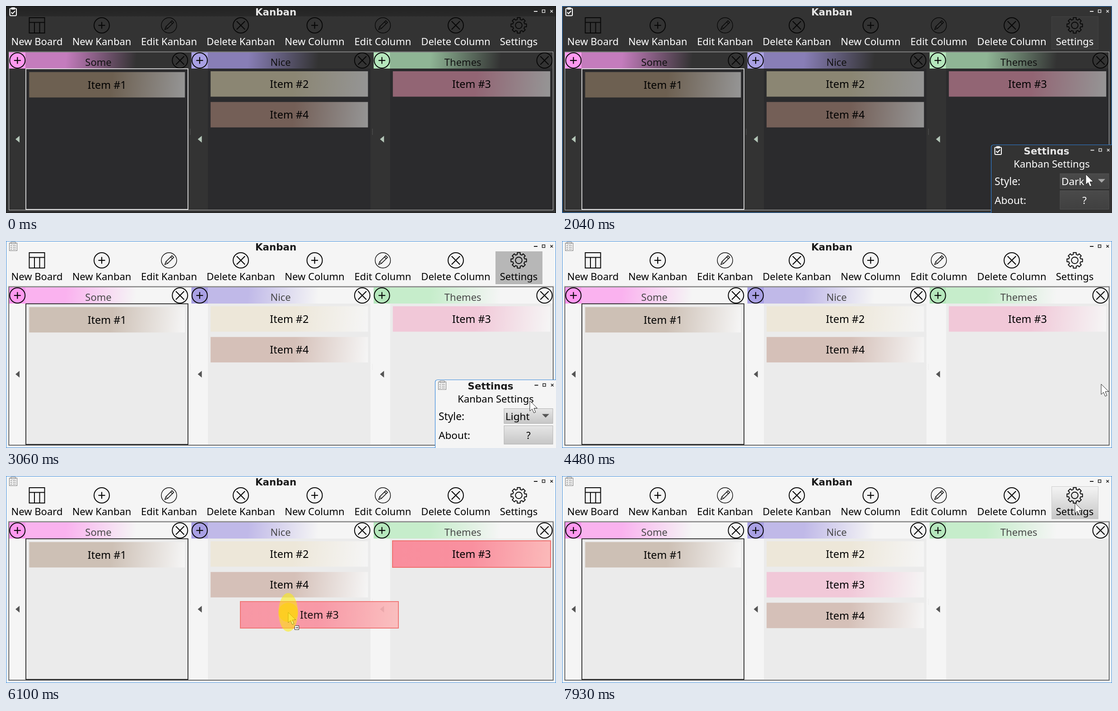
Write an HTML page with a canvas that moves like this. It is 1218 by 460 pixels and loops after 8000 ms.

```html
<!DOCTYPE html>
<html lang="en">
<head>
<meta charset="utf-8">
<title>Kanban board</title>
<style>
html, body { margin: 0; width: 100%; height: 100%; overflow: hidden; }
canvas { display: block; }
</style>
</head>
<body>
<canvas id="stage" width="1218" height="460"></canvas>
<script>
const g = document.getElementById('stage').getContext('2d');
const LOOP = 8000;

const DARK = {
  bg: '#333333', body: '#2b2b2d', text: '#ffffff', title: '#e6e6e6', heading: '#111111',
  frame: '#c4c4c4', focus: '#ffffff', arrow: '#b4c6b8', grip: '#777777', icon: '#080808',
  edge: '#2f7fd3', button: ['#4a4a4a', '#404040'], buttonEdge: '#525252', caret: '#a8a8a8',
  heads: ['#c47cbd', '#887eb6', '#8fb595'], cardEnd: '#959595',
  cards: ['#6d6051', '#8b8673', '#926574', '#745f57']
};
const LIGHT = {
  bg: '#f5f5f5', body: '#ebebeb', text: '#000000', title: '#1a1a1a', heading: '#484848',
  frame: '#202020', focus: '#000000', arrow: '#555555', grip: '#e4e4e4', icon: '#080808',
  edge: '#3a8bdc', button: ['#e6e6e6', '#c6c6c6'], buttonEdge: '#b0b0b0', caret: '#555555',
  heads: ['#fab2ef', '#c0b9e8', '#c6edcb'], cardEnd: '#f5f5f5',
  cards: ['#cdc0b5', '#ede7d9', '#f1c8d8', '#d5c0b8']
};
const PLUS_COLORS = ['#ff99f0', '#a9a0e4', '#b5e7bc'];
const COLUMNS = ['Some', 'Nice', 'Themes'];
const columnX = i => 7 + 403.6 * i;

// Pointer track: start time, x, y, mouse pressed
const POINTER = [
  [400, 1185, 190], [600, 1136, 48], [800, 1136, 48, 1], [1020, 1136, 48],
  [1420, 1141, 110], [1620, 1150, 240], [1820, 1158, 350], [2020, 1160, 374],
  [2220, 1160, 374, 1], [2450, 1160, 374], [2660, 1160, 355], [2860, 1160, 355, 1],
  [3060, 1160, 355], [3660, 1180, 340], [3860, 1207, 320], [4060, 1207, 320, 1],
  [4260, 1207, 320], [4480, 1194, 318], [4680, 656, 200], [4900, 962, 168, 1],
  [5100, 930, 180, 1], [5300, 850, 225, 1], [5500, 740, 285, 1], [5700, 620, 320, 1],
  [5900, 554, 323, 1], [6100, 625, 303, 1], [6320, 602, 303], [7330, 740, 270],
  [7530, 980, 160], [7730, 1128, 80], [7930, 1136, 60]
];

let theme;

function rect(x, y, w, h, fill, stroke, lineWidth = 1) {
  if (fill) { g.fillStyle = fill; g.fillRect(x, y, w, h); }
  if (stroke) { g.strokeStyle = stroke; g.lineWidth = lineWidth; g.strokeRect(x, y, w, h); }
}

function text(str, x, y, color, size = 22, align = 'center') {
  g.font = `${size}px "Noto Sans", sans-serif`;
  g.textAlign = align;
  g.fillStyle = color;
  g.fillText(str, x, y);
}

function line(points, color, width = 2, fill) {
  g.beginPath();
  points.forEach(([x, y]) => g.lineTo(x, y));
  if (fill) { g.closePath(); g.fillStyle = fill; g.fill(); }
  if (color) { g.strokeStyle = color; g.lineWidth = width; g.stroke(); }
}

function circle(x, y, r, color, width) {
  g.beginPath();
  g.arc(x, y, r, 0, 7);
  g.strokeStyle = color;
  g.lineWidth = width;
  g.stroke();
}

function at(x, y, angle, draw) {
  g.save();
  g.translate(x, y);
  g.rotate(angle);
  draw();
  g.restore();
}

function gradient(x0, y0, x1, y1, stops) {
  const fill = g.createLinearGradient(x0, y0, x1, y1);
  stops.forEach(([pos, color]) => fill.addColorStop(pos, color));
  return fill;
}

const vertical = (y, h, [top, bottom]) => gradient(0, y, 0, y + h, [[0, top], [1, bottom]]);

// Circled plus; turned by 45 degrees it becomes the delete cross
function plus(x, y, arm, angle = 0) {
  at(x, y, angle, () => {
    circle(0, 0, 17, theme.icon, 2);
    line([[-arm, 0], [arm, 0]], theme.icon, 2.2);
    line([[0, -arm], [0, arm]], theme.icon, 2.2);
  });
}
const add = (x, y) => plus(x, y, 7.5);
const remove = (x, y) => plus(x, y, 13, Math.PI / 4);

function table(x, y) {
  at(x, y, 0, () => {
    rect(-17, -17, 34, 34, null, theme.icon, 2);
    line([[-17, -6.5], [17, -6.5]], theme.icon);
    for (const dx of [-5.5, 6]) line([[dx, -6.5], [dx, 17]], theme.icon);
  });
}

function pencil(x, y) {
  circle(x, y, 17, theme.icon, 1.4);
  at(x, y, Math.PI / 4, () => {
    line([[-2.7, -12], [2.7, -12], [2.7, 7], [0, 13], [-2.7, 7], [-2.7, -12.7]], theme.icon, 1.5);
    line([[-2.7, -8], [2.7, -8]], theme.icon, 1.5);
    line([[-2.7, 7], [2.7, 7]], theme.icon, 1);
  });
}

function gear(x, y) {
  at(x, y, 0, () => {
    g.beginPath();
    for (let i = 0; i < 8; i++) {
      const a = i * Math.PI / 4;
      for (const [da, r] of [[-.24, 13.5], [-.19, 17.5], [.19, 17.5], [.24, 13.5]])
        g.lineTo(r * Math.cos(a + da), r * Math.sin(a + da));
    }
    g.closePath();
    g.lineJoin = 'round';
    g.strokeStyle = theme.icon;
    g.lineWidth = 1.9;
    g.stroke();
    circle(0, 0, 7.3, theme.icon, 1.9);
  });
}

const TOOLS = [
  ['New Board', 68.5, table], ['New Kanban', 212, add], ['Edit Kanban', 361, pencil],
  ['Delete Kanban', 520, remove], ['New Column', 683.5, add], ['Edit Column', 834.5, pencil],
  ['Delete Column', 996, remove], ['Settings', 1135.5, gear]
];

function clipboard() {
  if (theme === DARK) {
    g.beginPath();
    g.roundRect(8.5, 5.5, 14.5, 16, 2);
    g.strokeStyle = '#ffffff';
    g.lineWidth = 2;
    g.stroke();
    rect(12, 3, 7.5, 5, '#ffffff');
    line([[11.5, 14], [14.5, 17], [20, 11]], '#ffffff');
    return;
  }
  rect(7.5, 4.5, 17, 17, null, '#777777');
  rect(11, 2.5, 10, 3.5, '#e4e4e4', '#777777');
  for (const y of [10, 14, 18]) {
    line([[10, y], [11.2, y + 1], [13, y - 1]], '#555555', 1);
    line([[15, y], [22, y]], '#777777', 1);
  }
}

function titleBar(title, x, buttonsX) {
  clipboard();
  g.font = 'bold 21.4px "DejaVu Sans", sans-serif';
  g.textAlign = 'center';
  g.fillStyle = theme.title;
  g.fillText(title, x, 21);
  at(buttonsX, 0, 0, () => {
    rect(0, 11, 8, 2, theme.title);
    rect(18.5, 8.5, 6, 6, null, theme.title, 1.4);
    line([[36.5, 9], [42, 14.5]], theme.title, 1.5);
    line([[42, 9], [36.5, 14.5]], theme.title, 1.5);
  });
}

function toolbar(t) {
  const hover = t >= 600 && t < 4260 || t >= 7730;
  if (hover) {
    if (theme === DARK) rect(1084.5, 23.5, 103, 72, '#393939', '#424242');
    else if (t < 4260) rect(1084, 23, 104, 73, '#b7b7b7');
    else rect(1084.5, 23.5, 103, 72, vertical(23, 73, ['#f4f4f4', '#c6c6c6']), '#cccccc');
  }
  for (const [label, x, icon] of TOOLS) {
    icon(x, 43);
    text(label, x, 87, theme.text);
  }
}

function card(n, column, slot) {
  const inset = column === 0 ? 1.8 : 0;
  const x = columnX(column) + 42.5 + inset, y = 145 + 68.3 * slot + inset;
  const w = 348.5 - inset * 2, c = theme.cards[n - 1];
  rect(x, y, w, 56.5, gradient(x, y, x + w, y + 40, [[0, c], [.53, c], [1, theme.cardEnd]]));
  text('Item #' + n, x + w / 2, y + 37, '#000000', 23.4);
}

function redCard(x, y) {
  rect(x + 1, y + 1, 350, 59,
    gradient(x, y, x + 352, y + 40, [[0, '#f98e9d'], [.5, '#f9909f'], [1, '#fbbaba']]), '#f0706f', 2);
  text('Item #3', x + 176, y + 39, '#000000', 23.4);
}

function column(i) {
  const x = columnX(i);
  rect(x + 36.5, 139, 360, 313, theme.body);
  rect(x + 36.5, 103, 360, 36,
    gradient(x + 36, 103, x + 396, 140, [[0, theme.heads[i]], [.25, theme.heads[i]], [.68, theme.bg]]));
  rect(x, 103, 36.5, 36, PLUS_COLORS[i]);
  add(x + 18.3, 121);
  remove(x + 378.3, 121);
  text(COLUMNS[i], x + 197.5, 133, theme.heading);
  line([[x + 14, 296], [x + 23, 288.5], [x + 23, 303.5]], null, 0, theme.arrow);
  if (i < 2) for (let y = 273; y < 286; y += 2) rect(x + 400.5, y, 1, 1, theme.grip);
  if (i === 0) rect(44, 139.5, 359, 312.5, null, theme.focus, 1.5);
}

function board(t) {
  if (theme === LIGHT) rect(5, 100.5, 1208, 354, null, '#b4b4b4');
  rect(6.5, 102, 1205, 351.5, null, theme.frame);
  COLUMNS.forEach((_, i) => column(i));
  card(1, 0, 0);
  card(2, 1, 0);
  if (t < 6320) {
    card(4, 1, 1);
    if (t < 4900) card(3, 2, 0);
    else redCard(855, 143);
  } else {
    card(3, 1, 1);
    card(4, 1, 2);
  }
}

function control(y, h) {
  rect(1103, y, 108, h, vertical(y, h, theme.button), theme.buttonEdge);
}

function settings(t) {
  g.beginPath();
  g.roundRect(950.5, 308.5, 290, 180, 5);
  g.fillStyle = theme.bg;
  g.fill();
  g.strokeStyle = theme.edge;
  g.lineWidth = 1.2;
  g.stroke();

  g.save();
  g.beginPath();
  g.rect(951, 309, 267, 22);
  g.clip();
  g.translate(950, 308.5);
  titleBar('Settings', 123, 220.5);
  g.restore();

  text('Kanban Settings', 1084.5, 359, theme.text);
  text('Style:', 958, 398, theme.text, 22.8, 'left');
  text('About:', 958, 440, theme.text, 22.6, 'left');
  control(372.5, 33);
  text(theme === DARK ? 'Dark' : 'Light', 1106, 398, theme.text, 22.6, 'left');
  line([[1187, 384.5], [1203, 384.5], [1195, 392.5]], null, 0, theme.caret);
  control(410.5, 41);
  text('?', 1157, 440, theme.text);

  if (t >= 2450 && t < 3060) {
    rect(1102.5, 337.5, 109, 72, '#2b2b2d', '#222222');
    rect(1103, t < 2660 ? 373 : 338, 108, 35.5, '#2a82da');
    text('Light', 1107.5, 364, '#ffffff', 22.6, 'left');
    text('Dark', 1107.5, 400, '#ffffff', 22.6, 'left');
  }
}

function pointer(x, y, pressed, dragging) {
  at(x, y, 0, () => {
    line([[0, 0], [0, 23], [5.2, 18.2], [9, 27], [12.8, 25.3], [9, 16.8], [16.5, 16.5]],
      '#222222', 1, '#ffffff');
    if (dragging) {
      rect(14.5, 29.5, 9, 9, '#ffffff', '#333333');
      line([[16.5, 34], [21, 34]], '#222222', 1);
      line([[19, 32], [21.3, 34], [19, 36]], '#222222', 1);
    }
    if (!pressed) return;
    g.fillStyle = 'rgba(255, 240, 0, .52)';
    g.beginPath();
    g.ellipse(0, 0, 21.5, 43, 0, 0, 7);
    g.fill();
    g.fillStyle = 'rgba(255, 214, 0, .55)';
    g.beginPath();
    g.arc(0, 0, 21.5, 0, 7);
    g.fill();
  });
}

function draw(t) {
  theme = t < 3060 ? DARK : LIGHT;
  const focused = t >= 800;
  rect(0, 0, 1218, 460, theme.bg);
  if (!focused) rect(0, 0, 1218, 23, vertical(0, 23, ['#222222', '#292929']));
  titleBar('Kanban', 597.5, 1169);
  toolbar(t);
  board(t);
  rect(.5, .5, 1217, 459, null, focused ? theme.edge : '#161616');
  if (t >= 1020 && t < 4260) settings(t);

  const step = POINTER.findLast(p => p[0] <= t);
  if (!step) return;
  const [, x, y, pressed] = step;
  const dragging = t >= 5100 && t < 6320;
  if (dragging) {
    g.globalAlpha = .9;
    redCard(x - 107, y - 25);
    g.globalAlpha = 1;
  }
  pointer(x, y, pressed, dragging);
}

const start = performance.now();
function tick() {
  draw((performance.now() - start) % LOOP);
  requestAnimationFrame(tick);
}
tick();
</script>
</body>
</html>
```
